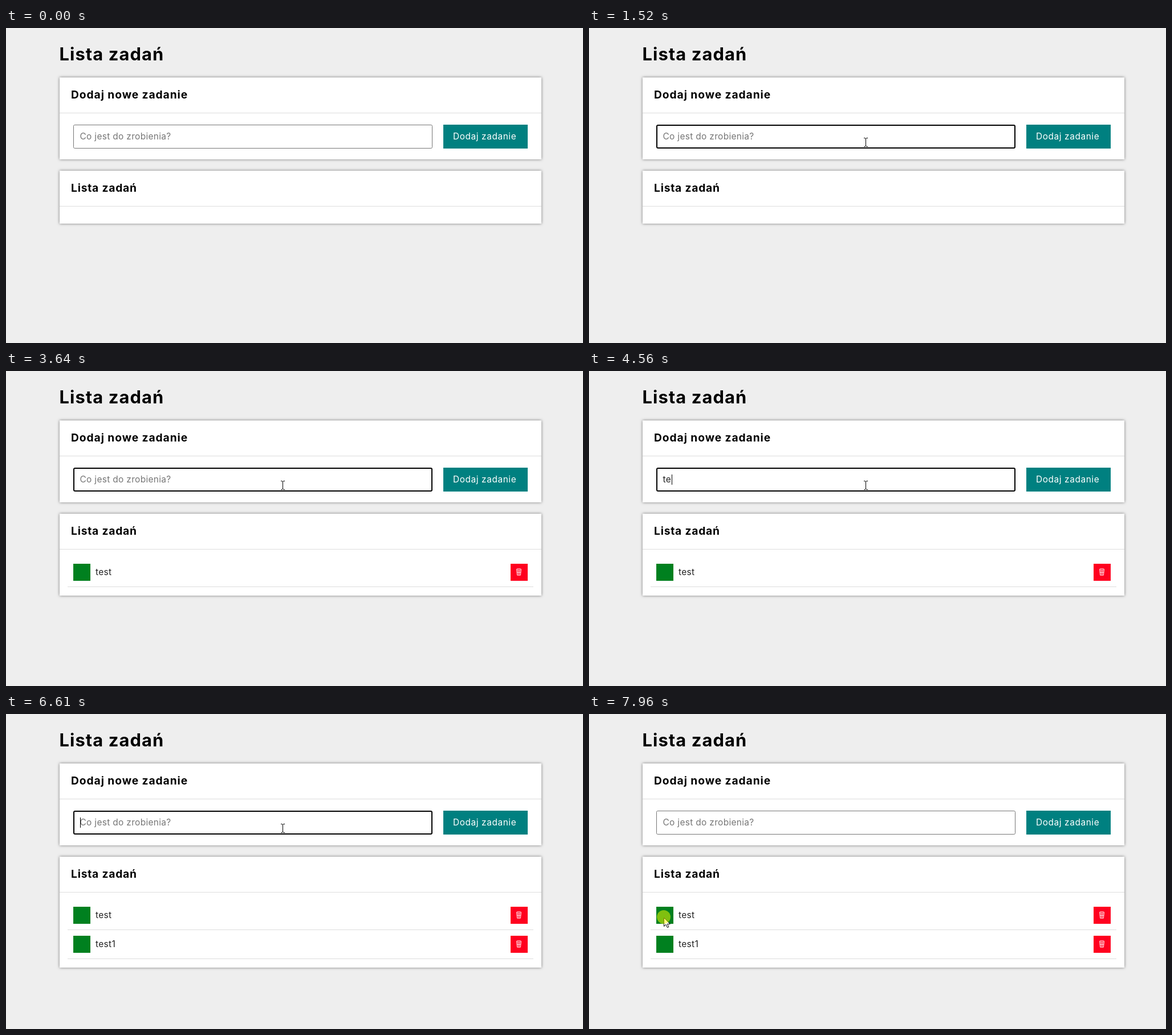
An HTML page for the animation above (8000 ms loop, 1012 px wide and 554 px high).

```html
<!DOCTYPE html>
<html lang="pl">
<head>
<meta charset="utf-8">
<title>Lista zadań</title>
<style>
  html, body { margin: 0; width: 100%; height: 100%; overflow: hidden; background: #eee; }
  svg { display: block; width: 1012px; height: 554px; }
  text { font: 400 15.4px Inter, "Open Sans", sans-serif; letter-spacing: .35px; fill: #222; white-space: pre; }
  .title { font-weight: 700; font-size: 30.8px; letter-spacing: 1.1px; fill: #000; }
  .head { font-weight: 700; font-size: 19.2px; letter-spacing: .95px; fill: #000; }
  .hint { fill: #757575; }
  .add { fill: #fff; letter-spacing: .6px; }
  .card { fill: #fff; filter: drop-shadow(0 0 2.5px rgba(0, 0, 0, .5)); }
  .line { fill: #ddd; }
  .done { fill: #00801f; }
  .remove { fill: #ff001f; }
  .bin { fill: none; stroke: #fff; stroke-width: .9; }
</style>
</head>
<body>
<svg viewBox="0 0 1012 554">
  <defs>
    <g id="row">
      <rect class="done" x="118" y="339" width="30" height="30"/>
      <rect class="remove" x="885" y="339" width="30" height="30"/>
      <path class="bin" d="M895.5 349.3 L896.7 359.2 H902.3 L903.5 349.3 M898 350 L898.5 358.5 M901 350 L900.5 358.5 M896 354 H903"/>
      <ellipse class="bin" cx="899.5" cy="348.8" rx="4.2" ry="1.2"/>
      <rect class="line" x="108" y="379" width="817" height="1"/>
    </g>
  </defs>
  <rect width="1012" height="554" fill="#eee"/>
  <text class="title" x="93.5" y="57">Lista zadań</text>

  <rect class="card" x="94" y="87" width="845" height="144"/>
  <text class="head" x="114" y="124">Dodaj nowe zadanie</text>
  <rect class="line" x="94" y="149" width="845" height="1"/>
  <rect id="field" fill="#fff" rx="2"/>
  <text id="entry" x="129.5" y="196"></text>
  <rect id="caret" y="182" width="1" height="18"/>
  <rect x="767" y="170" width="148" height="42" fill="teal"/>
  <text class="add" x="784" y="196">Dodaj zadanie</text>

  <rect id="list" class="card" x="94" y="251" width="845"/>
  <text class="head" x="114" y="288" style="letter-spacing:.8px">Lista zadań</text>
  <rect class="line" x="94" y="313" width="845" height="1"/>
  <g id="item0"><use href="#row"/><text x="157" y="359.3">test</text></g>
  <g id="item1" transform="translate(0 51)"><use href="#row"/><text x="157" y="359.3">test1</text></g>

  <path id="beam" fill="none" stroke="#000" d="M-3 -7.5 H-1 L.5 -6.5 L2 -7.5 H4 M.5 -7 V7 M-3 7.5 H-1 L.5 6.5 L2 7.5 H4"/>
  <path id="arrow" fill="#fff" stroke="#000" stroke-linejoin="round"
    d="M.5 .5 V15.5 L4 12.2 L6.4 17.6 L8.8 16.6 L6.5 11.3 H11.3 Z"/>
  <circle id="press" r="12" fill="#ff0" fill-opacity=".5"/>
</svg>
<script>
const LOOP = 8000, STEP = 67.3, BLINK = 530;
const el = id => document.getElementById(id);
const show = (id, on) => el(id).setAttribute('visibility', on ? 'visible' : 'hidden');
const set = (id, attrs) => {
  for (const k in attrs) el(id).setAttribute(k, attrs[k]);
};

// [time, characters typed]
const typing = [
  [0, 0], [1590, 1], [2050, 2], [2320, 3], [2720, 4], [3640, 0],
  [4370, 1], [4560, 2], [4820, 3], [5150, 4], [5550, 5], [5950, 0]
];
const caretX = [130, 136, 145, 152, 159, 164];
// Keystrokes restart the caret's blink
const blinkStarts = [990, ...typing.filter(k => k[1]).map(k => k[0])];

// [time, x, y] of the pointer
const path = [
  [120, 923, 540], [860, 485, 201], [6810, 485, 201], [6950, 432, 234],
  [7140, 425, 238], [7760, 121, 355], [7900, 131, 358], [8000, 131, 358]
];

function latest(list, t) {
  return list.filter(v => (v[0] ?? v) <= t).pop();
}

function pointer(t) {
  const i = path.findIndex(p => p[0] > t);
  if (i < 1) return null;
  const [t0, x0, y0] = path[i - 1], [t1, x1, y1] = path[i];
  const now = t0 + Math.floor((t - t0 + STEP) / STEP) * STEP - STEP;
  const u = (now - t0) / (t1 - t0);
  const k = i === 1 ? 1 - (1 - u) ** 2 : u * u * (3 - 2 * u);
  return [x0 + (x1 - x0) * k, y0 + (y1 - y0) * k];
}

function render(t) {
  const count = latest(typing, t)[1];
  const items = t >= 5950 ? 2 : t >= 3640 ? 1 : 0;
  const focused = t >= 990 && t < 7960;
  const pos = pointer(t);
  const inField = pos && pos[0] > 118 && pos[0] < 748 && pos[1] > 170 && pos[1] < 212;

  const w = focused ? 2 : 1;
  set('field', {
    x: 118 + w / 2, y: 170 + w / 2, width: 630 - w, height: 42 - w,
    'stroke-width': w, stroke: focused ? '#000' : inField ? '#444' : '#767676'
  });
  el('entry').textContent = count ? 'test1'.slice(0, count) : 'Co jest do zrobienia?';
  el('entry').setAttribute('class', count ? '' : 'hint');

  const since = t - (latest(blinkStarts, t) ?? t);
  show('caret', focused && Math.floor(since / BLINK) % 2 === 0);
  set('caret', { x: caretX[count] });

  set('list', { height: items ? 93 + 51 * items : 93 });
  show('item0', items > 0);
  show('item1', items > 1);

  show('beam', inField);
  show('arrow', pos && !inField);
  show('press', (t >= 990 && t < 1060) || t >= 7960);
  if (pos) {
    const [x, y] = pos.map(Math.round);
    set('beam', { transform: `translate(${x} ${y})` });
    set('arrow', { transform: `translate(${x} ${y})` });
    set('press', { cx: x, cy: y - 1 });
  }
}

function tick() {
  render(performance.now() % LOOP);
  requestAnimationFrame(tick);
}
tick();
</script>
</body>
</html>
```
